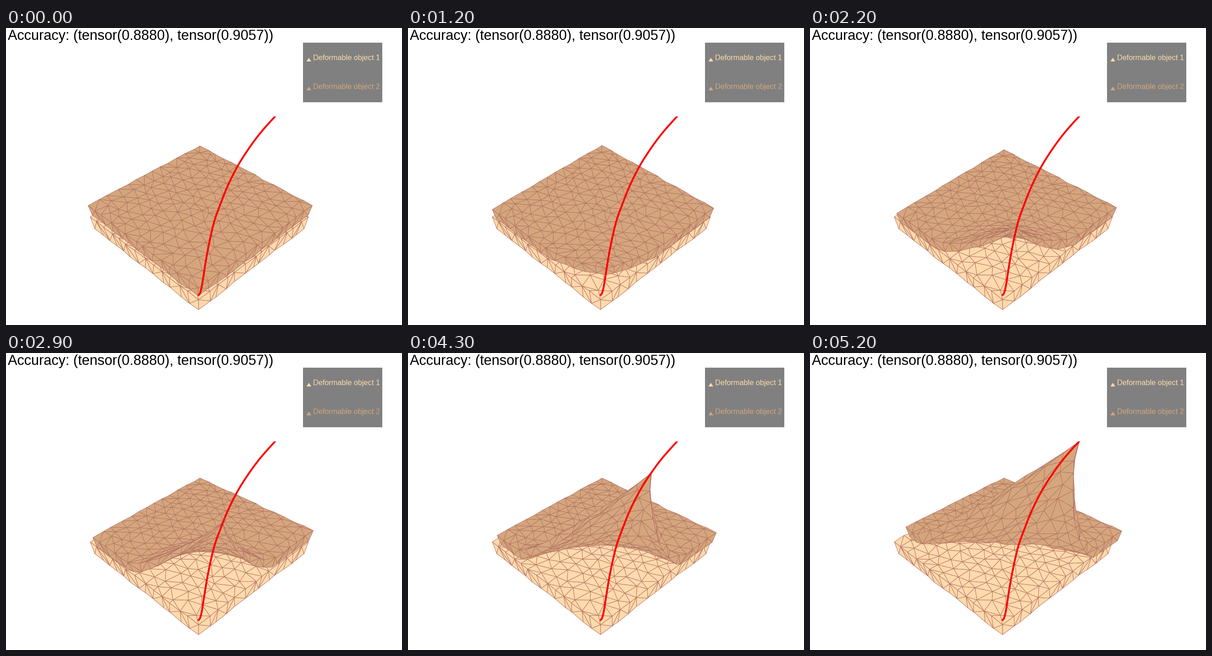
These frames come from a looping animation (864 by 648 pixels, 5.3 s). A matplotlib script:

```python
import numpy as np
import matplotlib.pyplot as plt
from matplotlib.animation import FuncAnimation
from matplotlib.collections import PolyCollection
from matplotlib.patches import Polygon, Rectangle
from matplotlib.tri import Triangulation

W, H = 864, 648
FRAMES, INTERVAL = 53, 100
LIGHT, TAN, EDGE = "#ffdaac", "#d4a67d", "#b47364"
N = 13  # mesh cells along one side of a slab

# Pinhole camera looking down on the slabs along their diagonal
FOCAL, DIST = 1209, 4.945
SIN, COS = 0.5774, 0.8165
SHIFT_X, SHIFT_Y = -0.042, -0.26


def project(p):
    x, y, z = p.T
    depth = DIST + COS * y - SIN * z
    sx = W / 2 + FOCAL * (x + SHIFT_X) / depth
    sy = H / 2 - FOCAL * (SIN * y + COS * z + SHIFT_Y) / depth
    return np.column_stack([sx, sy]), depth


def unproject(sx, sy, y):
    """World point that is seen at (sx, sy) and has the given y."""
    q = (H / 2 - sy) / FOCAL
    z = (q * (DIST + COS * y) - SHIFT_Y - SIN * y) / (COS + SIN * q)
    depth = DIST + COS * y - SIN * z
    return np.array([(sx - W / 2) / FOCAL * depth - SHIFT_X, y, z])


def spline(t, ts, vs):
    """Cubic Hermite curve through the points (ts, vs)."""
    ts, vs = np.asarray(ts, float), np.asarray(vs, float)
    m = np.gradient(vs, ts)
    i = np.clip(np.searchsorted(ts, t, side="right") - 1, 0, len(ts) - 2)
    h = ts[i + 1] - ts[i]
    u = (t - ts[i]) / h
    return ((1 + 2 * u) * (1 - u) ** 2 * vs[i] + u * (1 - u) ** 2 * h * m[i]
            + u * u * (3 - 2 * u) * vs[i + 1] + u * u * (u - 1) * h * m[i + 1])


def square_mesh(rng):
    """Irregular triangles on the unit square; the first 4N points are its rim."""
    corners = np.array([(0, 0), (1, 0), (1, 1), (0, 1)], float)
    pts = []
    for k in range(4):
        a, b = corners[k], corners[(k + 1) % 4]
        for i in range(N):
            t = (i + (rng.uniform(-0.22, 0.22) if i else 0)) / N
            pts.append(a + (b - a) * t)
    for j in range(1, N):
        for i in range(N):
            u = i + 0.5 * (j % 2)
            if 0.4 < u < N - 0.4:
                pts.append((np.array([u, j]) + rng.uniform(-0.24, 0.24, 2)) / N)
    pts = np.array(pts)
    tris = Triangulation(pts[:, 0], pts[:, 1]).triangles.copy()
    a, b, c = pts[tris].transpose(1, 0, 2)
    area = ((b[:, 0] - a[:, 0]) * (c[:, 1] - a[:, 1])
            - (b[:, 1] - a[:, 1]) * (c[:, 0] - a[:, 0]))
    tris[area < 0] = tris[area < 0][:, ::-1]
    return pts, tris


def slab(seed, z_top, z_bottom, scale_top, scale_bottom):
    """Closed slab: flat coordinates, 3D points and outward faces."""
    rng = np.random.default_rng(seed)
    flats, solids, faces, start = [], [], [], 0
    layers = ((z_top, scale_top, 1), (z_bottom, scale_bottom, -1))
    for z, scale, turn in layers:
        ab, tris = square_mesh(rng)
        flat = np.column_stack([ab[:, 0] - ab[:, 1], ab.sum(axis=1) - 1])
        noise = rng.uniform(-0.006, 0.006, (len(flat), 3))
        noise[:4 * N:N] = 0
        solids.append(np.column_stack([flat * scale, np.full(len(flat), z)]) + noise)
        flats.append(flat)
        faces.append(tris[:, ::turn] + start)
        if turn == 1:
            start = len(flat)
    wall = []
    for i in range(4 * N):
        j = (i + 1) % (4 * N)
        low, low_next = start + i, start + j
        if i % 2:
            wall += [(low, low_next, j), (low, j, i)]
        else:
            wall += [(low, low_next, i), (low_next, j, i)]
    faces.append(np.array(wall))
    return np.vstack(flats), np.vstack(solids), np.vstack(faces)


def visible(points, faces):
    """Screen triangles facing the camera, farthest first."""
    xy, depth = project(points)
    tri = xy[faces]
    e1, e2 = tri[:, 1] - tri[:, 0], tri[:, 2] - tri[:, 0]
    front = e1[:, 0] * e2[:, 1] - e1[:, 1] * e2[:, 0] < 0
    order = np.argsort(-depth[faces[front]].mean(axis=1))
    return tri[front][order]


# Path of the pulled corner on the screen
PATH_X = [419, 423.5, 427.5, 432.5, 440.5, 453.5, 467.5, 483.5, 505, 529, 555, 586, 590]
PATH_Y = [584, 578, 562, 530, 483, 425, 385, 345, 302, 264, 229, 194, 190]
knots = np.arange(len(PATH_X))
fine = np.linspace(0, knots[-1], 300)
path_x, path_y = spline(fine, knots, PATH_X), spline(fine, knots, PATH_Y)

# Motion keys
KEYS = [0, 8, 16, 29, 35, 43, 52]
TIP_Y = [584, 567, 503, 372, 325, 262, 194]
REACH = [0.5, 0.6, 0.8, 0.92, 0.95, 0.95, 0.95]
POWER = [1.5, 1.5, 1.5, 1.5, 1.45, 1.4, 1.3]
LEFT_SPREAD = [1, 1, 1, 1, 0.9, 0.65, 0.32]
RIGHT_SPREAD = [1, 1, 1, 1, 1, 0.95, 0.75]
LEFT_DX = [2, 3, 8, 10, 11, 16, 33]
LEFT_DY = [0, 2, 16, 16, 15, 11, -8]
RIGHT_DX = [2, 1, 2, 4, 5, 7, 14]
RIGHT_DY = [0, 3, 8, 0, 3, 5, 1]
BACK_DY = [0, -2, 1, 15, 15, 15, 15]

BASE_Z, BASE_SCALE = -0.11, 0.975
flat, rest, upper_faces = slab(7, 0, BASE_Z, 1, BASE_SCALE)
_, lower_points, lower_faces = slab(21, -0.13, -0.27, 0.988, 0.963)
TIP = np.array([0, -BASE_SCALE, BASE_Z])


def pose(k):
    """Points of the upper slab at step k."""
    def key(values):
        return spline(k, KEYS, values)

    sy = key(TIP_Y)
    rise = (584 - sy) / 390
    sx = np.interp(-sy, -path_y, path_x)
    pull = unproject(sx, sy, -BASE_SCALE + 1.075 * rise) - TIP

    x, y = flat.T
    left, right, back = (np.clip(v, 0, 1) for v in (-x, x, y))
    spread = np.where(x < 0, key(LEFT_SPREAD), key(RIGHT_SPREAD))
    dist = np.hypot(y + 1, spread * x)
    w = np.clip(1 - dist / key(REACH), 0, 1) ** key(POWER)

    p = rest.copy()
    thin = 1 - 0.9 * w * min(1, 1.5 * rise)
    p[:, 2] = BASE_Z + (p[:, 2] - BASE_Z) * thin
    # The flap leans right and its right edge curls inwards
    lean = 1.15 - 0.15 * np.clip(4 * x, -1, 1)
    p[:, 0] += pull[0] * w ** lean - 0.3 * rise * w * right
    p[:, 1] += pull[1] * w
    p[:, 2] += pull[2] * w

    p[:, 0] += (key(LEFT_DX) * left + key(RIGHT_DX) * right) / 244
    p[:, 2] -= (key(LEFT_DY) * left + key(RIGHT_DY) * right) / 200
    p[:, 2] -= key(BACK_DY) * back / 171
    return p


fig = plt.figure(figsize=(W / 72, H / 72), dpi=72, facecolor="white")
ax = fig.add_axes([0, 0, 1, 1])
ax.set(xlim=(0, W), ylim=(H, 0))
ax.axis("off")


def mesh_artist(color, zorder):
    art = PolyCollection([], facecolor=color, edgecolor=EDGE, linewidth=0.95,
                         joinstyle="round", zorder=zorder)
    return ax.add_collection(art, autolim=False)


lower = mesh_artist(LIGHT, 1)
lower.set_verts(visible(lower_points, lower_faces))
upper = mesh_artist(TAN, 2)

line, = ax.plot(path_x, path_y, color="red", lw=4, zorder=3,
                solid_capstyle="butt", solid_joinstyle="round")
line.set_clip_path(Rectangle((0, 193), W, H - 193, transform=ax.transData))

ax.text(3.5, 26, "Accuracy: (tensor(0.8880), tensor(0.9057))", color="black",
        family="Liberation Sans", size=30.6, va="baseline", zorder=4)
ax.add_patch(Rectangle((648, 32), 173, 130, fc="#808080", ec="none", zorder=4))
for number, base, color in ((1, 70, LIGHT), (2, 133, TAN)):
    ax.add_patch(Polygon([(655.5, base + 3), (666, base + 3), (660.8, base - 5)],
                         fc=color, ec="none", zorder=5))
    ax.text(669.5, base, f"Deformable object {number}", color=color,
            family="Liberation Sans", size=16.2, va="baseline", zorder=5)


def draw(k):
    upper.set_verts(visible(pose(k), upper_faces))
    return upper,


anim = FuncAnimation(fig, draw, frames=FRAMES, interval=INTERVAL,
                     repeat=True, repeat_delay=0)
plt.show()
```
